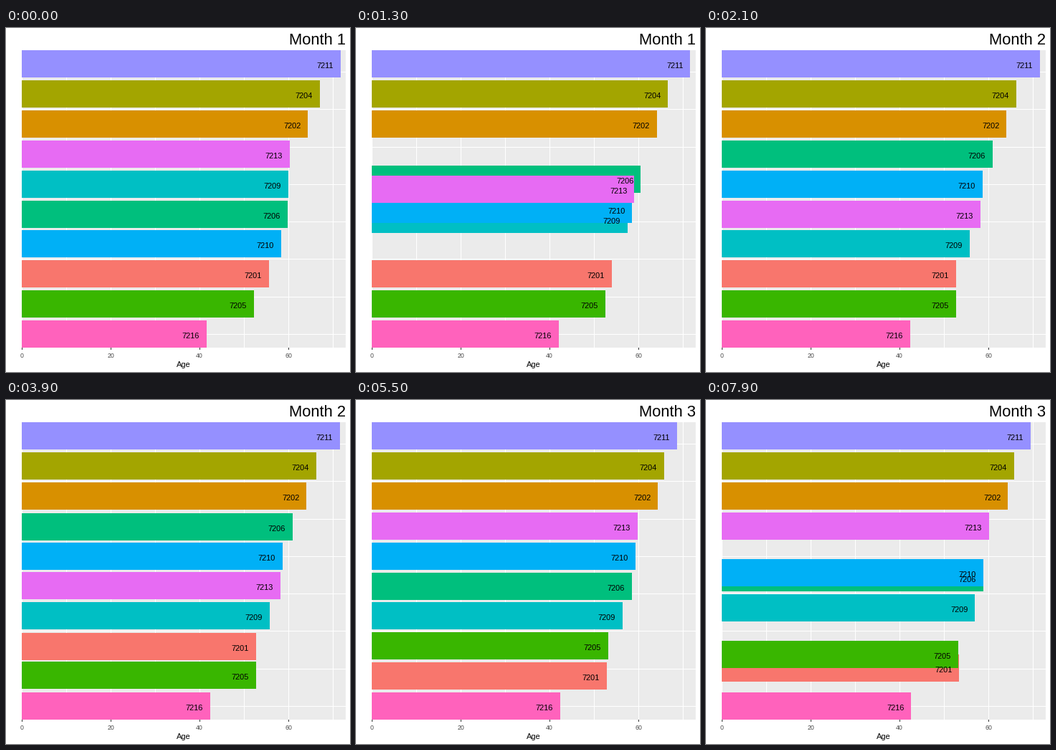
A matplotlib script that plays this animation: 480x480 px, repeating every 8 s.

```python
import math

import matplotlib.pyplot as plt
from matplotlib.animation import FuncAnimation
from matplotlib.patches import Rectangle

SIZE, FRAMES, INTERVAL = 480, 80, 100
LEFT, RIGHT, TOP, BOTTOM = 22, 474, 31, 446
STEP, BAR = 41.9, 38            # row pitch and bar height
FIRST, PERIOD, MOVE = 4, 34, 17  # first move, spacing and length, in frames

# id: colour, then the right edge of the bar in each month
BARS = {
    "7201": ("#F8766D", (367, 349, 350, 361)),
    "7202": ("#D89000", (421, 419, 421, 421)),
    "7204": ("#A3A500", (438, 433, 430, 430)),
    "7205": ("#39B600", (346, 348.9, 352, 352)),
    "7206": ("#00BF7D", (393, 400, 385, 392)),
    "7209": ("#00BFC4", (394, 368, 372, 383)),
    "7210": ("#00B0F6", (384, 386, 390, 379)),
    "7211": ("#9590FF", (467, 466, 448, 466)),
    "7213": ("#E76BF3", (396, 383, 393, 400)),
    "7216": ("#FF62BC", (280, 285, 285, 289)),
}

plt.rcParams["font.family"] = "Liberation Sans"
fig = plt.figure(figsize=(SIZE / 72, SIZE / 72), dpi=72, facecolor="white")
ax = fig.add_axes([0, 0, 1, 1])
ax.set_xlim(0, SIZE)
ax.set_ylim(SIZE, 0)
ax.axis("off")


def box(x, y, w, h, color, z=1):
    patch = Rectangle((x, y), w, h, fc=color, lw=0, antialiased=False, zorder=z)
    return ax.add_patch(patch)


def label(x, y, text, size, ha="center", color="black"):
    return ax.text(x, y, text, size=size, ha=ha, va="baseline",
                   color=color, zorder=4)


def ease(p):
    return 4 * p**3 if p < 0.5 else 1 - 4 * (1 - p)**3


def row_top(rank):
    return math.floor(TOP + 0.55 + STEP * rank)


def bar_top(a, b, e):
    """Pixel row of a bar between ranks a and b; any motion shows at once."""
    d = (b - a) * STEP * e
    if e >= 1:
        return row_top(b)
    if abs(d) < 1:
        return row_top(a) + math.copysign(math.ceil(abs(d)), d)
    return math.floor(TOP + 0.55 + STEP * a + d)


def ranking(month):
    order = sorted(BARS, key=lambda k: -BARS[k][1][month])
    return {k: i for i, k in enumerate(order)}


RANKS = [ranking(m) for m in range(4)]

# panel, grid and axis
box(LEFT, TOP, RIGHT - LEFT, BOTTOM - TOP, "#EBEBEB")
for i in range(8):
    box(LEFT + 62 * i, TOP, 1, BOTTOM - TOP, "white")
    box(LEFT, round(427 - 52.3 * i), RIGHT - LEFT, 1, "white")
for i in range(4):
    x = LEFT + 124 * i
    box(x, BOTTOM, 1, 3, "#333333")
    label(x, 460, str(20 * i), 8.8, color="#4D4D4D")
label(248, 473, "Age", 11)
title = label(RIGHT, 23, "Month 1", 22, "right")

rects = {k: box(LEFT, TOP, 10, BAR, c, 3) for k, (c, _) in BARS.items()}
tags = {k: label(LEFT, TOP, k, 11, "right") for k in BARS}


def update(frame):
    month = max(0, (frame - FIRST) // PERIOD)
    step = min(max(frame - FIRST - month * PERIOD, 0), MOVE)
    e = ease(step / MOVE)
    title.set_text(f"Month {month + 1 + (step >= 10)}")
    for k, (_, edges) in BARS.items():
        a, b = edges[month:month + 2]
        right = a + (b - a) * e
        y = bar_top(RANKS[month][k], RANKS[month + 1][k], e)
        rects[k].set_y(y)
        rects[k].set_width(round(right) - LEFT)
        tags[k].set_position((right - 9.8, y + 25))
    return [title, *rects.values(), *tags.values()]


anim = FuncAnimation(fig, update, frames=FRAMES, interval=INTERVAL,
                     repeat=True, repeat_delay=0, blit=False)
plt.show()
```
